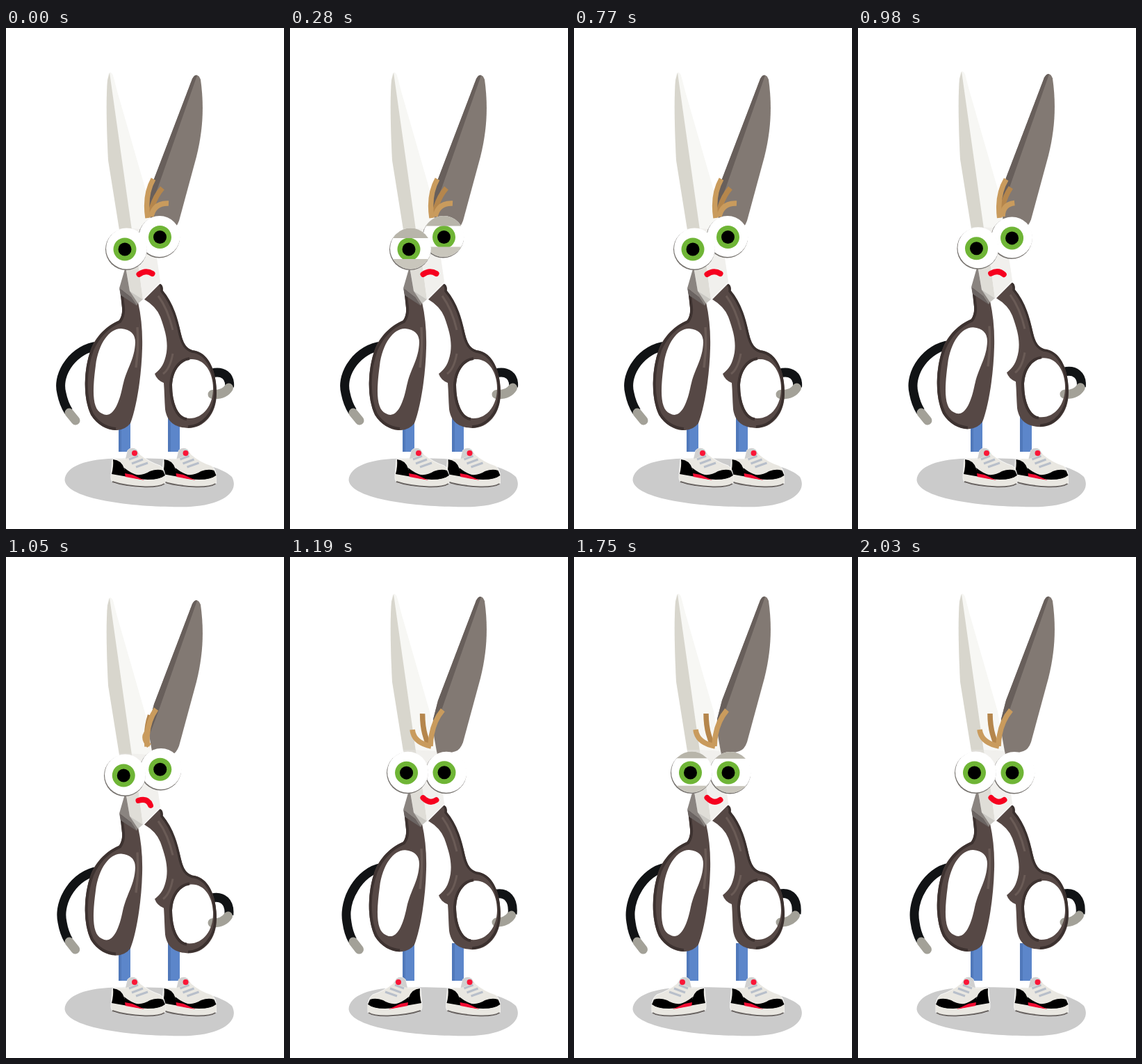
These frames come from a looping animation (400 by 720 pixels, 2100 ms). An HTML page:

```html
<!DOCTYPE html>
<html lang="en">
<head>
<meta charset="utf-8">
<title>Moody scissors</title>
<style>
html, body { margin: 0; width: 100%; height: 100%; overflow: hidden; background: #fff; }
svg { display: block; width: 100vw; height: 100vh; }
.line { fill: none; }
</style>
</head>
<body>
<svg viewBox="0 0 400 720">
  <defs>
    <g id="shoe">
      <path fill="#e9e7e1" stroke="#fff" stroke-width=".8" d="M153 620Q163 618 172 619L175 607Q181 601 188 606L193 613Q206 624 222 629Q229 634 229 646L229 654Q224 660 205 660.500Q190 661 175 658L156 654Q151 652 151 645Z"/>
      <path fill="#d0d0d0" d="M172 619L175 607Q181 601 188 606L191 612L176 618Z"/>
      <path fill="#000" d="M154 620Q166 621 170 633L175 645L152 641Q155 630 154 620Z"/>
      <path fill="#000" d="M170 632Q180 640 188 642Q198 643 207 637Q218 633 226 636L229 643Q222 649 204 649Q190 649 172 641Z"/>
      <path fill="#f20b32" d="M171 640L182 642L199 650L172 646Z"/>
      <path fill="#e9e7e1" d="M151 643L172 645L198 650Q218 651 229.500 643L229 653Q216 659 193 658L158 653Q151 651 151 643Z"/>
      <path class="line" stroke="#6a6563" stroke-width="2" d="M153 652Q170 658 200 659.500Q220 660 228 655"/>
      <path class="line" stroke="#b8bfca" stroke-width="3" d="M177 620L190 615M181 626L197 620M187 631L204 625"/>
      <circle fill="#fa1637" cx="185" cy="611" r="4"/>
    </g>
    <clipPath id="ball"><circle r="29.5"/></clipPath>
    <g id="eye">
      <circle cx="-.7" cy="1.2" r="29.8" fill="#77736f"/>
      <circle r="29.5" fill="#fff"/>
    </g>
    <g id="iris">
      <circle r="16.5" fill="#6fb536"/>
      <circle r="9.5"/>
    </g>
  </defs>

  <path fill="#cbcbcb" d="M84.500 650C85 630 115 618.500 165 618.500C230 617 300 622 325 645C336 665 315 685 265 688C200 690 88 680 84.500 650Z"/>
  <g fill="#5c86ca">
    <path d="M162 552H179V609H162ZM233 555H250V609H233Z"/>
    <path fill="#5078ba" d="M162 552H166V609H162ZM233 555H237V609H233Z"/>
  </g>
  <use href="#shoe" x="73.5"/>
  <use href="#shoe" id="leftShoe"/>

  <g class="line" stroke-width="13">
    <path id="armL" stroke="#111315"/>
    <path id="handL" stroke="#a3a198" stroke-linecap="round"/>
    <path id="armR" stroke="#111315"/>
    <path id="handR" stroke="#a3a198" stroke-linecap="round"/>
  </g>

  <g id="body">
    <!-- dark blade -->
    <path fill="#827973" d="M268 73Q275 62 280 74C285 110 284 145 274 185L249 277Q245 288 238 290L203 300L206 244L213 217Z"/>
    <path fill="#685f5b" d="M268 73Q271 67 275 68L219 228L206 262V244L213 217Z"/>
    <!-- right handle -->
    <path fill="#564845" fill-rule="evenodd" d="M199 390L221 368Q226 368 225 377C240 395 247 420 252 440C255 455 260 460 268 463C290 465 303 490 303 525C303 555 285 575 262 575C245 574 232 568 229 548C228 535 228 522 227 510Q217 506 214 497C223 490 228 483 231 466C233 450 230 437 222 415Q216 400 199 390ZM266 476C252 477 240 492 239 513C239 540 248 561 264 561C284 561 298 542 298 518C298 495 286 475 266 476Z"/>
    <path class="line" stroke="#3a302e" stroke-width="3.5" d="M221 369Q225 371 224 378C240 397 246 420 250 440C254 456 259 462 268 465C289 467 301 491 301 525C301 553 283 572 262 573"/>
    <path class="line" stroke="#3d3230" stroke-width="4" d="M264 475C249 477 238 492 237 513C237 540 246 561 260 562"/>
    <path class="line" stroke="#6a5b56" stroke-width="3" d="M219 385Q233 404 240 434M240 468Q236 490 226 497"/>
    <!-- left handle -->
    <path fill="#564845" fill-rule="evenodd" d="M164 371L190 394Q197 425 196 460C195 500 188 545 179 568Q172 577 160 578C148 579 132 572 122 556C110 530 112 490 122 462C132 437 150 426 163 420Q168 412 167 402ZM166 432C150 431 133 452 129 485C124 522 124 548 138 554C152 562 162 544 168 514C174 488 185 477 186 452Q186 434 166 432Z"/>
    <path class="line" stroke="#3d3230" stroke-width="4" d="M166 376L169 402Q170 414 164 422C150 428 134 440 124 463C114 490 112 530 124 555Q136 574 158 576"/>
    <path class="line" stroke="#6a5b56" stroke-width="3.5" d="M189 430C191 455 189 470 187 488"/>
    <!-- light blade -->
    <path fill="#f7f7f4" d="M146 75Q148 57 154 68L160 91L201 233L211 290L222 365L197 390L178 378L172 340L147 190Q143 110 146 75Z"/>
    <path fill="#d8d6cd" d="M149 64L181 290L163 290L147 190Q143 110 146 75Z"/>
    <path fill="#dfddd7" d="M163 288H181L191 345L197 390L178 378Z"/>
    <path fill="#f1f0ed" d="M181 288L191 345L197 390L222 365L211 290Z"/>
    <path fill="#8a8480" d="M172 343L163 374L180 387L188 399L192 391L178 378Z"/>
    <path fill="#6b6462" d="M163 374L180 387L188 399L165 384Z"/>
    <path fill="#c9c7c2" d="M178 378L197 390L190 396Z"/>
  </g>

  <g class="line" stroke-width="7.5">
    <path id="hairB" stroke="#b5864c"/>
    <path id="hairC" stroke="#c99b5d"/>
    <path id="hairA" stroke="#c99b5d"/>
  </g>
  <path id="mouth" class="line" stroke="#f6001f" stroke-width="8" stroke-linecap="round"/>
  <g id="eyes"></g>
</svg>
<script>
const LOOP = 2100, STEP = 70;
const $ = id => document.getElementById(id);
const lerp = (a, b, p) => a + (b - a) * p;

// Blend two paths that share the same commands.
const mix = (a, b, p) => {
  const ends = b.match(/[\d.]+/g);
  let i = 0;
  return a.replace(/[\d.]+/g, v => lerp(+v, +ends[i++], p));
};

// Sad pose, then happy pose.
const poses = {
  armL: ["M132 457C100 460 72 495 80 525Q83 540 90 551", "M132 446C100 452 76 492 82 525Q84 540 90 551"],
  handL: ["M91 553L100 564", "M91 553L99.500 564"],
  armR: ["M296 496C312 492 323 500 321.500 516", "M296 484C312 481 322 492 320 513"],
  handR: ["M320.500 517C315 526 305 527 297 526.500", "M318.500 515C313 523 304 525 297 525"],
  hairA: ["M204 273Q199 240 212 217", "M202 272Q203 240 220 220"],
  hairB: ["M207 271Q211 246 225 230", "M200 271Q190 252 190 225"],
  hairC: ["M209 271Q213 251 234 252", "M203 272Q177 267 175 248"]
};
const mouths = ["M191.500 354Q201 347 210.500 353", "M190.500 350Q204 346 208 357", "M191.500 346Q201 356 210.500 349"];

// Each entry holds [x, y] of the ball and iris in both poses.
const eyes = [
  { ball: [[221, 299.5], [225, 309.5]], iris: [[221.5, 300.5], [222, 310]] },
  { ball: [[173.5, 317], [169.5, 309]], iris: [[171, 318], [167.5, 310]] }
];
$("eyes").innerHTML = eyes.map(() => `<g>
  <use href="#eye"/><use href="#iris"/>
  <g clip-path="url(#ball)">
    <rect x="-30" y="-30" width="60" fill="#b8b5aa"/>
    <rect x="-30" width="60" fill="#c9c6bc"/>
  </g></g>`).join("");

const rise = t => {
  const u = Math.min(1, Math.max(0, (t - 840) / 420));
  return u < .5 ? 4 * u ** 3 : 1 - 4 * (1 - u) ** 3;
};
const blink = (t, mid, span) => Math.max(0, 1 - Math.abs(t - mid) / span);
const place = (el, x, y) => el.setAttribute("transform", `translate(${x} ${y})`);

function draw(t) {
  const p = rise(t);
  for (const id in poses) $(id).setAttribute("d", mix(...poses[id], p));
  const half = p > .5 ? 1 : 0;
  $("mouth").setAttribute("d", mix(mouths[half], mouths[half + 1], p * 2 - half));
  place($("body"), 0, -11 * p);
  $("leftShoe").setAttribute("transform", p > .55 ? "translate(341 0) scale(-1 1)" : "");

  const lid = 30 * Math.max(blink(t, 350, 140), blink(t, 1855, 160));
  eyes.forEach(({ ball, iris }, i) => {
    const el = $("eyes").children[i];
    const at = ([a, b]) => [lerp(a[0], b[0], p), lerp(a[1], b[1], p)];
    const [x, y] = at(ball), [ix, iy] = at(iris);
    place(el, x, y);
    place(el.children[1], ix - x, iy - y);
    const [top, low] = el.children[2].children;
    top.setAttribute("height", lid);
    low.setAttribute("y", 30 - lid);
    low.setAttribute("height", lid);
  });
}

function tick() {
  draw(Math.floor(performance.now() % LOOP / STEP) * STEP);
  requestAnimationFrame(tick);
}
tick();
</script>
</body>
</html>
```
